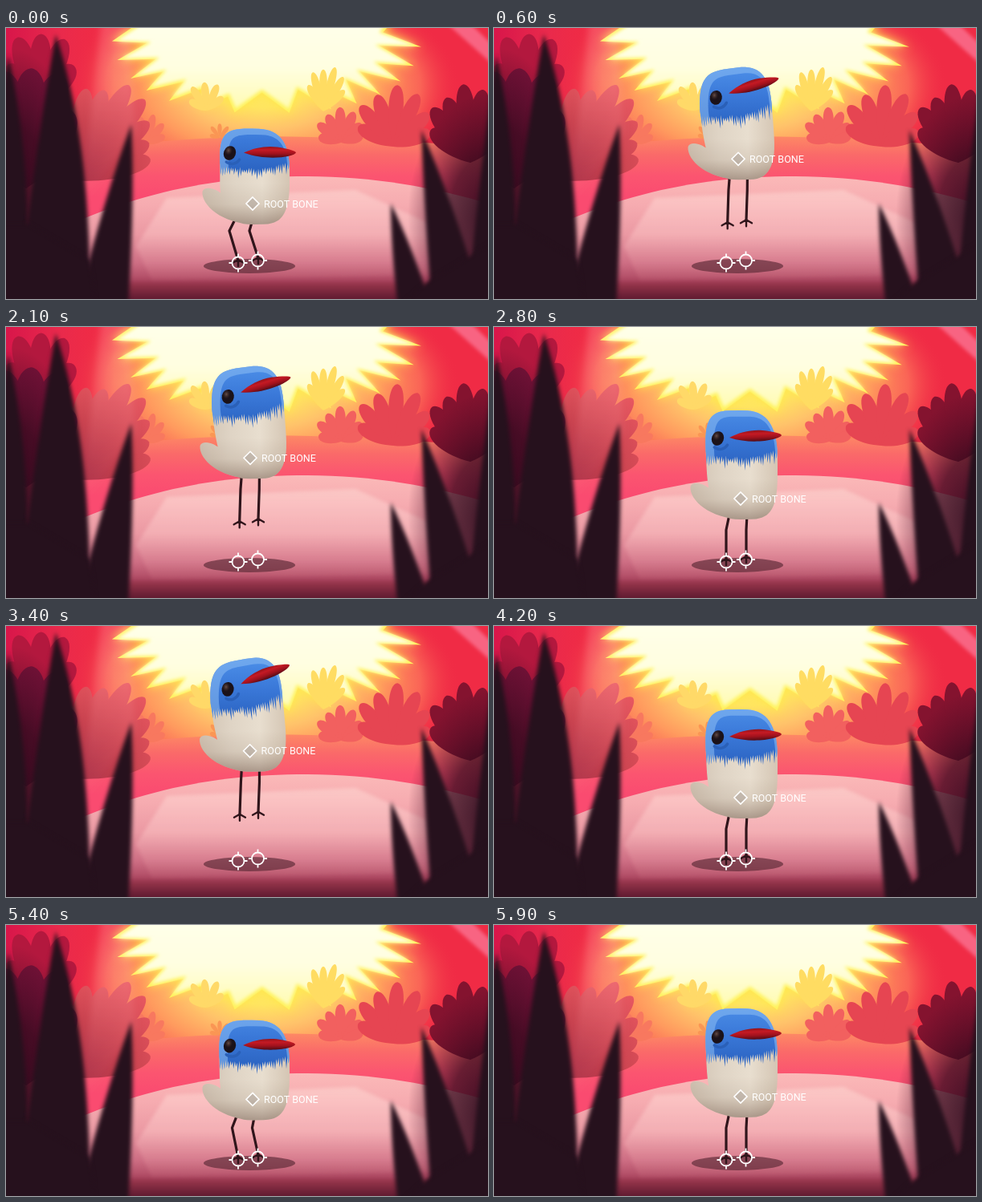
Write an HTML page with a canvas that moves like this. It is 600 px wide and 338 px high and loops after 6 s.

```html
<!DOCTYPE html>
<html lang="en">
<head>
<meta charset="utf-8">
<title>Root bone</title>
<style>
html, body { margin: 0; width: 100%; height: 100%; overflow: hidden; background: #2a1220; }
canvas { display: block; width: 100vw; height: 100vh; }
</style>
</head>
<body>
<canvas id="stage" width="600" height="338"></canvas>
<script>
const W = 600, H = 338, STEP = 100, JUMP = 1500;
const REST = 214, TOP = 153.8, CROUCH = 5;
const DARK = '#26111d';
const stage = document.getElementById('stage').getContext('2d');
const clamp = (v, a = 0, b = 1) => Math.min(b, Math.max(a, v));
const mix = (a, b, k) => a + (b - a) * k;
const smooth = k => k * k * (3 - 2 * k);
const noise = i => Math.abs(Math.sin(i * 12.99 + 1.7) * 437.5) % 1;
const power = (v, n) => Math.sign(v) * Math.abs(v) ** n;

// Spreads the colours evenly along a gradient.
function shade(gradient, colors) {
  colors.forEach((color, i) => gradient.addColorStop(i / (colors.length - 1), color));
  return gradient;
}
const down = (c, y0, y1, ...colors) => shade(c.createLinearGradient(0, y0, 0, y1), colors);
const across = (c, x0, x1, ...colors) => shade(c.createLinearGradient(x0, 0, x1, 0), colors);

function glow(c, x, y, rx, ry, ...colors) {
  c.save();
  c.translate(x, y);
  c.scale(rx, ry);
  c.fillStyle = shade(c.createRadialGradient(0, 0, 0, 0, 0, 1), colors);
  c.fillRect(-1, -1, 2, 2);
  c.restore();
}

function polygon(c, points, fill) {
  c.beginPath();
  points.forEach(([x, y]) => c.lineTo(x, y));
  c.closePath();
  c.fillStyle = fill;
  c.fill();
}

function leaf(c, x, y, length, width, deg, fill) {
  c.save();
  c.translate(x, y);
  c.rotate(deg * Math.PI / 180);
  c.beginPath();
  c.moveTo(0, 0);
  c.bezierCurveTo(length * .45, -width * .72, length * .98, -width * .72, length, 0);
  c.bezierCurveTo(length * .98, width * .72, length * .45, width * .72, 0, 0);
  c.fillStyle = fill;
  c.fill();
  c.restore();
}

function fan(c, x, y, count, length, width, from, to, fill) {
  for (let i = 0; i < count; i++) {
    const k = i / (count - 1);
    const size = length * (.7 + .3 * Math.sin(Math.PI * k)) * (1 - .12 * noise(i));
    leaf(c, x, y, size, width, mix(from, to, k), fill);
  }
}

// A grass blade with one steep, bulging side and one sloped, hollow side.
function blade(c, tipX, tipY, steep, sloped) {
  const y = mix(tipY, 350, .4);
  c.beginPath();
  c.moveTo(steep, 350);
  c.quadraticCurveTo(mix(steep, tipX, .12) + 8 * Math.sign(steep - sloped), y, tipX, tipY);
  c.quadraticCurveTo(mix(sloped, tipX, .5), y, sloped, 350);
  c.fill();
}

function layer(...painters) {
  const canvas = document.createElement('canvas');
  canvas.width = W;
  canvas.height = H;
  const c = canvas.getContext('2d');
  painters.forEach(paint => {
    c.save();
    paint(c);
    c.restore();
  });
  return canvas;
}

function paintSky(c) {
  c.fillStyle = '#f02b45';
  c.fillRect(0, 0, W, H);
  glow(c, 320, 72, 245, 136, '#ffe75e', '#ffe560', '#ffc36a', '#ff9a5e', '#fa6456', 'rgba(240,43,69,0)');

  // Ragged half disc of light: tips and notches alternate along its rim.
  const spikes = 28, points = [];
  for (let i = 0; i <= spikes; i++) {
    const angle = Math.PI * (i + .5 * noise(i + 5)) / spikes;
    const reach = i % 2 ? 1 : .83 - .1 * noise(i);
    points.push([
      325 + 194 * reach * power(Math.cos(angle), .8),
      108 * reach * power(Math.sin(angle), .8) - 2
    ]);
  }
  points.push([150, -30], [500, -30]);
  c.shadowColor = '#ffe84a';
  c.shadowBlur = 12;
  polygon(c, points, '#fff25e');
  c.shadowBlur = 0;
  c.filter = 'blur(2px)';
  c.translate(325, 0);
  c.scale(.965, .95);
  c.translate(-325, 0);
  polygon(c, points, down(c, 0, 105, '#ffffe9', '#fffee0', '#fffbb4'));
}

function paintMeadow(c) {
  c.beginPath();
  c.moveTo(0, 165);
  c.bezierCurveTo(150, 142, 270, 132, 380, 136);
  c.bezierCurveTo(460, 139, 540, 143, 600, 150);
  c.lineTo(600, H);
  c.lineTo(0, H);
  c.fillStyle = down(c, 132, 210, '#fe8d64', '#fa6a69', '#fb5570', '#fa4b70');
  c.fill();
}

function paintPlants(c) {
  fan(c, 250, 103, 5, 40, 9, -150, -40, '#ffd968');
  fan(c, 395, 104, 6, 60, 9, -120, -45, '#ffdc62');
  fan(c, 266, 137, 5, 20, 5, -165, -15, '#fa9654');
  fan(c, 175, 145, 6, 40, 9, -155, -25, '#f8785f');
  fan(c, 417, 143, 7, 46, 12, -165, -18, '#f2605f');
  fan(c, 482, 148, 7, 80, 17, -150, -22, '#e64552');
  fan(c, 578, 168, 7, 102, 21, -140, -50, '#84132f');

  c.fillStyle = across(c, 0, 135, '#d8164a', '#e92a4c', 'rgba(240,43,69,0)');
  c.fillRect(0, 0, 135, 180);
  fan(c, 40, 100, 5, 105, 24, -125, -50, '#b3183e');
  fan(c, 82, 190, 8, 145, 23, -92, -15, across(c, 0, 145, '#a52d45', '#c9424f', '#ec5b63'));
  fan(c, 25, 200, 5, 170, 38, -115, -60, '#741238');
}

function paintGround(c) {
  c.beginPath();
  c.moveTo(0, 285);
  c.bezierCurveTo(130, 212, 240, 185, 375, 185);
  c.bezierCurveTo(455, 185, 535, 199, 600, 219);
  c.lineTo(600, H);
  c.lineTo(0, H);
  c.fillStyle = down(c, 185, 330, '#fbb9b8', '#f6abb0', '#eb99a3', '#cd6d83', '#97304c');
  c.fill();
  c.filter = 'blur(2px)';
  polygon(c, [[162, 272], [200, 212], [435, 202], [530, 245], [545, 307], [182, 316]],
    down(c, 200, 315, 'rgba(255,222,216,.5)', 'rgba(255,205,204,.4)', 'rgba(240,150,160,.1)'));
  c.filter = 'blur(3px)';
  c.fillStyle = down(c, 316, H, '#a03a50', '#5f1a30');
  c.fillRect(0, 317, W, 40);
}

function paintLight(c) {
  const edge = ['rgba(45,10,28,.95)', 'rgba(55,10,30,.75)', 'rgba(70,10,35,0)'];
  glow(c, 605, 235, 105, 155, ...edge);
  glow(c, 5, 215, 95, 190, ...edge);
  c.globalCompositeOperation = 'screen';
  c.filter = 'blur(4px)';
  polygon(c, [[119, -10], [153, -10], [161, 130], [92, 225]],
    down(c, 0, 220, 'rgba(255,115,105,.35)', 'rgba(255,110,120,0)'));
  c.filter = 'blur(2px)';
  polygon(c, [[546, -8], [575, -8], [610, 25], [610, 49]], 'rgba(255,126,154,.55)');
}

function paintGrass(c) {
  c.filter = 'blur(2.5px)';
  c.fillStyle = DARK;
  blade(c, 3, 35, 27, -40);
  blade(c, 62, 8, 104, 13);
  blade(c, 156, 120, 152, 88);
  blade(c, 517, 127, 530, 596);
  blade(c, 479, 219, 488, 531);
  blade(c, 605, 75, 640, 574);
  polygon(c, [[-10, 245], [28, 245], [104, 290], [112, 350], [-10, 350]], DARK);
  polygon(c, [[523, 318], [610, 265], [610, 350], [488, 350]], DARK);
}

const scene = layer(paintSky, paintMeadow, paintPlants, paintGround, paintLight);
const grass = layer(paintGrass);

// Push off, fall with gravity, sink on landing, wait, crouch again.
function rootHeight(t) {
  if (t < 450) return mix(REST + CROUCH, TOP, (1 - Math.cos(Math.PI * t / 450)) / 2);
  if (t < 828) return mix(TOP, REST, ((t - 450) / 378) ** 2);
  if (t < 1128) return REST + CROUCH * Math.sin(Math.PI * (t - 828) / 300);
  return REST + CROUCH * smooth(clamp((t - 1400) / 100));
}

function poseAt(time) {
  const y = rootHeight(time % JUMP);
  const lift = clamp((REST - y) / 60);
  return { x: 307 - 3.5 * lift, y, lift, tilt: lift * lift, squash: clamp((y - REST) / CROUCH) };
}

// Squashes and tilts a body point; the effect grows towards the head.
function bend(pose, x, y) {
  const k = smooth(clamp(-y / 70));
  const flat = y < 0 ? y * (1 - .15 * pose.squash) : y;
  return [
    x + k * (3 * pose.squash * (x < 0) - 6 * pose.tilt),
    flat - pose.tilt * k * (5 + .18 * x)
  ];
}

// Rounded box that narrows at the lower left, joined by a tail.
function bodyPath(pose) {
  const path = new Path2D();
  for (let i = 0; i < 72; i++) {
    const cos = Math.cos(i * Math.PI / 36), sin = -Math.sin(i * Math.PI / 36);
    const round = cos * sin < 0 ? .72 : .5;
    const y = -42 + 68 * power(sin, cos > 0 && sin > 0 ? .6 : round);
    const half = cos > 0 ? 46 : 46 - (y + 110) * .05;
    path.lineTo(...bend(pose, half * power(cos, round), y));
  }
  path.closePath();
  path.moveTo(-36, -10);
  path.bezierCurveTo(-44, -19, -60, -23, -62.5, -15);
  path.bezierCurveTo(-64, 2, -38, 25, 2, 26);
  path.closePath();
  return path;
}

function featherPath(pose) {
  const path = new Path2D();
  path.moveTo(-90, -150);
  path.lineTo(90, -150);
  for (let i = 0; i <= 70; i++) {
    const x = 49 - i * 1.4;
    const edge = -55 - x * .02 + 6 * Math.cos(x / 25);
    path.lineTo(...bend(pose, x, edge + (i % 2 ? 4 + noise(i) * 11 : -noise(i) * 4)));
  }
  path.closePath();
  return path;
}

function drawLeg(c, { x, y, lift, squash }, side) {
  const groundX = side ? 314 : 289;
  const footX = groundX + (side ? 0 : 2 * lift);
  const footY = Math.min(side ? 287 : 290, y + (side ? 77 : 80));
  const hipX = x + (side ? 8 : -14) + 4 * lift - 8 * squash;
  const kneeX = groundX + (side ? 1.5 : 3.5) * lift - 11 * squash;
  c.strokeStyle = '#30151b';
  c.lineWidth = 3.2;
  c.lineCap = c.lineJoin = 'round';
  c.beginPath();
  c.moveTo(hipX, y + 20);
  c.lineTo(kneeX, Math.min(y + 39, 253));
  c.lineTo(footX, footY);
  c.stroke();
  c.lineWidth = 2.4;
  c.beginPath();
  for (const dx of [-7, 0, 7]) {
    c.moveTo(footX, footY - 1);
    c.lineTo(footX + dx, footY + (dx ? 3 : 7));
  }
  c.stroke();
}

function drawEye(c, { tilt, squash }) {
  c.save();
  c.translate(-28.5 + tilt, -75 + 12 * squash - 2 * tilt);
  c.rotate(.15 - tilt * .2);
  c.strokeStyle = '#2a60b8';
  c.lineWidth = 3.5;
  c.lineCap = 'round';
  c.beginPath();
  c.arc(3, 2, 11, .4, 2.1);
  c.stroke();
  c.beginPath();
  c.ellipse(0, 0, 7.5, 9, .2, 0, 7);
  c.fillStyle = '#1b1219';
  c.fill();
  glow(c, -2, -3, 5, 6, '#6a5049', 'rgba(60,40,40,0)');
  c.restore();
}

function drawBeak(c, { tilt, squash }) {
  c.save();
  c.translate(-14 + 3 * (tilt + squash), -76 + 12.5 * squash - 8 * tilt);
  c.rotate(-.046 - .345 * tilt + .046 * squash);
  c.beginPath();
  c.moveTo(0, 0);
  c.bezierCurveTo(12, -6, 28, -9, 42, -7);
  c.bezierCurveTo(55, -5, 65, -2, 65, 0);
  c.bezierCurveTo(63, 5, 29, 11, 0, 0);
  c.fillStyle = down(c, -8, 6, '#8f1119', '#c51a24', '#a0121d', '#550c16');
  c.fill();
  c.restore();
}

function drawBird(c, pose) {
  drawLeg(c, pose, 0);
  drawLeg(c, pose, 1);
  c.save();
  c.translate(pose.x, pose.y);
  const body = bodyPath(pose);
  c.save();
  c.clip(body);
  c.fillStyle = across(c, -60, 48, '#d0c2b2', '#dfd4c5', '#e8decf', '#d3c4b2');
  c.fillRect(-80, -150, 170, 200);
  c.fillStyle = down(c, -25, 27, 'rgba(125,98,80,0)', 'rgba(125,98,80,.12)', 'rgba(105,78,66,.5)');
  c.fillRect(-80, -25, 170, 60);
  c.clip(featherPath(pose));
  c.fillStyle = down(c, -110, -45, '#4a8ce6', '#3a78d8', '#2d66c4');
  c.fillRect(-90, -150, 180, 150);
  c.translate(4, 1);
  c.strokeStyle = 'rgba(140,190,245,.55)';
  c.lineWidth = 13;
  c.stroke(body);
  c.restore();
  drawEye(c, pose);
  drawBeak(c, pose);
  c.restore();
}

function drawTarget(c, x, y) {
  c.strokeStyle = '#fff';
  c.lineWidth = 1.8;
  c.lineCap = 'butt';
  c.beginPath();
  c.arc(x, y, 7.5, 0, 7);
  for (let i = 0; i < 4; i++) {
    const dx = Math.cos(i * Math.PI / 2), dy = Math.sin(i * Math.PI / 2);
    c.moveTo(x + dx * 7, y + dy * 7);
    c.lineTo(x + dx * 11.5, y + dy * 11.5);
  }
  c.stroke();
}

function drawBone(c, { x, y }) {
  c.save();
  c.translate(x, y);
  polygon(c, [[0, -8], [8, 0], [0, 8], [-8, 0]], 'rgba(125,115,115,.25)');
  c.strokeStyle = c.fillStyle = '#fff';
  c.lineWidth = 1.6;
  c.lineJoin = 'miter';
  c.stroke();
  c.font = '12.5px Roboto, sans-serif';
  c.fillText('ROOT BONE', 14, 4.5);
  c.restore();
}

function draw(c, now) {
  const pose = poseAt(Math.floor(now / STEP) * STEP);
  c.drawImage(scene, 0, 0);
  c.beginPath();
  c.ellipse(303, 297, 57, 9, 0, 0, 7);
  c.fillStyle = 'rgba(92,42,54,.66)';
  c.fill();
  drawBird(c, pose);
  c.drawImage(grass, 0, 0);
  drawTarget(c, 289, 293);
  drawTarget(c, 313.5, 290);
  drawBone(c, pose);
}

const start = performance.now();
function tick() {
  draw(stage, performance.now() - start);
  requestAnimationFrame(tick);
}
tick();
</script>
</body>
</html>
```
